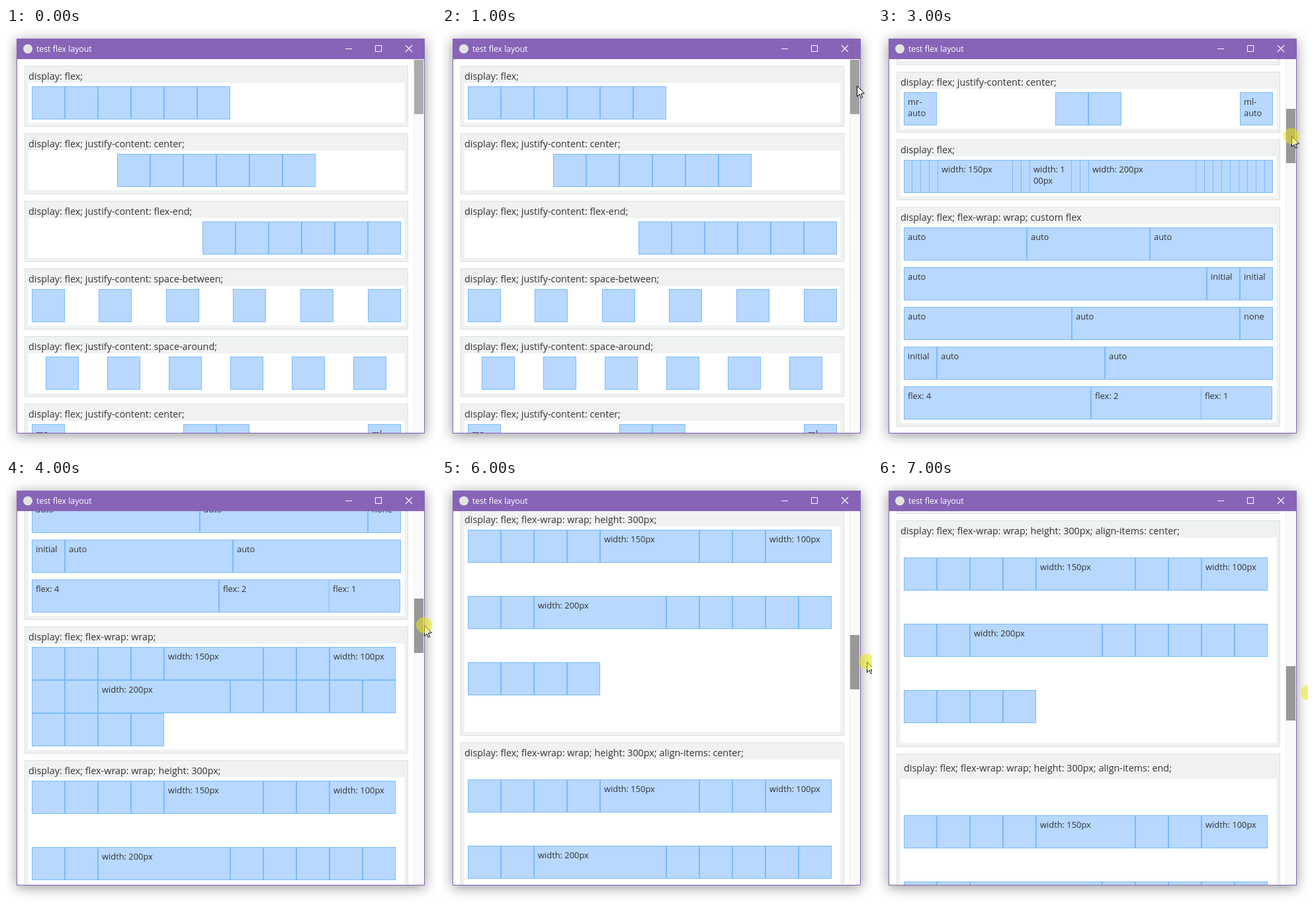
An HTML page with a canvas that plays this animation: 650x640 px, repeating every 7.99 s.

```html
<!DOCTYPE html>
<html lang="en">
<head>
<meta charset="utf-8">
<title>Flex layout</title>
<style>
html, body { margin: 0; width: 100%; height: 100%; overflow: hidden; background: #fff; }
canvas { display: block; }
</style>
</head>
<body>
<canvas id="stage" width="650" height="640"></canvas>
<script>
const ctx = document.getElementById('stage').getContext('2d');
const LOOP = 7990, STEP = 1000;
const FONT = '"Open Sans", "Noto Sans", sans-serif';
const PURPLE = '#8764b8';

// One entry per second: scroll offset, thumb offset, thumb colour, pointer tip, pressed
const steps = [
  { scroll: 0, thumb: 0, shade: '#ababab' },
  { scroll: 0, thumb: 0, shade: '#a1a1a1', tip: [627, 87] },
  { scroll: 0, thumb: 0, tip: [628, 87], pressed: true },
  { scroll: 501, thumb: 74, tip: [625, 163], pressed: true },
  { scroll: 892, thumb: 131, tip: [632, 219], pressed: true },
  { scroll: 1057, thumb: 155, tip: [634, 243], pressed: true },
  { scroll: 1271, thumb: 186, tip: [642, 274], pressed: true },
  { scroll: 1606, thumb: 233, tip: [651, 321], pressed: true }
];

function rect(x, y, w, h, color) {
  ctx.fillStyle = color;
  ctx.fillRect(x, y, w, h);
}

function frame(x, y, w, h, fill, border) {
  rect(x, y, w, h, border);
  rect(x + 1, y + 1, w - 2, h - 2, fill);
}

function text(str, x, y, size, color = '#333') {
  ctx.font = `${size}px ${FONT}`;
  ctx.fillStyle = color;
  ctx.fillText(str, x, y);
}

function circle(x, y, r, color) {
  ctx.fillStyle = color;
  ctx.beginPath();
  ctx.arc(x, y, r, 0, Math.PI * 2);
  ctx.fill();
}

function item(x, y, w = 50, label = '') {
  const left = Math.floor(x);
  frame(left, y, Math.ceil(x + w - 0.001) - left, 50, '#b8d8ff', '#7abaff');
  label.split('\n').forEach((line, i) => text(line, left + 6, y + 19 + i * 17, 12.87));
}

// Cells are widths, or [width, label] pairs, laid side by side
function row(y, cells, x = 39) {
  for (const cell of cells) {
    const [w, label] = [].concat(cell);
    item(x, y, w, label);
    x += w;
  }
}

function spread(y, x, gap) {
  for (let i = 0; i < 6; i++) item(Math.floor(x + gap * i), y);
}

const many = (n, w = 50) => Array(n).fill(w);
const six = x => y => row(y + 31, many(6), x);

const wrapped = (first, pitch) => y => {
  row(y + first, [...many(4), [150, 'width: 150px'], 50, 50, [100, 'width: 100px']]);
  row(y + first + pitch, [50, 50, [200, 'width: 200px'], ...many(5)]);
  row(y + first + pitch * 2, many(4));
};

function autoMargins(y) {
  item(39, y + 31, 50, 'mr-\nauto');
  row(y + 31, many(2), 268);
  item(547, y + 31, 50, 'ml-\nauto');
}

function shrunk(y) {
  const s = 12.9;
  row(y + 31, [...many(4, s), [113, 'width: 150px'], s, s, [63, 'width: 1\n00px'],
    s, s, [162.7, 'width: 200px'], ...many(9, s)]);
}

function customFlex(y) {
  const rows = [
    many(3, [186, 'auto']),
    [[458, 'auto'], [50, 'initial'], [50, 'initial']],
    [[254, 'auto'], [254, 'auto'], [50, 'none']],
    [[50, 'initial'], [254, 'auto'], [254, 'auto']],
    [[283, 'flex: 4'], [166.5, 'flex: 2'], [107.5, 'flex: 1']]
  ];
  rows.forEach((cells, i) => row(y + 31 + i * 60, cells));
}

const flex = 'display: flex;';
const wrap = flex + ' flex-wrap: wrap;';
const tall = wrap + ' height: 300px;';
// label, height, content, extra label padding
const sections = [
  [flex, 92, six(39)],
  [flex + ' justify-content: center;', 92, six(168)],
  [flex + ' justify-content: flex-end;', 92, six(297)],
  [flex + ' justify-content: space-between;', 92, y => spread(y + 31, 39, 101.6)],
  [flex + ' justify-content: space-around;', 92, y => spread(y + 31, 60, 93)],
  [flex + ' justify-content: center;', 92, autoMargins],
  [flex, 92, shrunk],
  [wrap + ' custom flex', 332, customFlex],
  [wrap, 192, wrapped(31, 50)],
  [tall, 342, wrapped(31, 100)],
  [tall + ' align-items: center;', 342, wrapped(56, 100)],
  [tall + ' align-items: end;', 354, wrapped(93, 100), 6]
];

function drawSections(scroll) {
  let y = 57 - scroll;
  for (const [label, h, content, pad = 0] of sections) {
    if (y + h > 47 && y < 611) {
      const head = 26 + pad * 2;
      frame(28, y, 580, h, '#f0f2f2', '#dcdfdf');
      rect(34, y + head, 568, h - head - 6, '#fff');
      text(label, pad ? 39 : 34, y + 21 + pad, 14.37);
      content(y);
    }
    y += h + 10;
  }
}

function drawTitleBar() {
  rect(16, 16, 617, 31, PURPLE);
  circle(33, 31.5, 7, '#e3e5e0');
  text('test flex layout', 46, 36, 12.3, '#fff');
  rect(513, 31, 10, 1, '#fff');
  frame(558, 26, 10, 10, PURPLE, '#fff');
  ctx.strokeStyle = '#fff';
  ctx.lineWidth = 1.1;
  ctx.beginPath();
  ctx.moveTo(604, 26);
  ctx.lineTo(614, 36);
  ctx.moveTo(614, 26);
  ctx.lineTo(604, 36);
  ctx.stroke();
}

function drawPointer([x, y], pressed) {
  const arrow = [[0.5, 0.5], [0.5, 16.5], [4, 13], [6.5, 18.5], [8.7, 17.5], [6.3, 12.2], [11.3, 11.7]];
  ctx.beginPath();
  arrow.forEach(([dx, dy]) => ctx.lineTo(x + dx, y + dy));
  ctx.closePath();
  ctx.fillStyle = '#fff';
  ctx.fill();
  ctx.strokeStyle = '#000';
  ctx.lineWidth = 1;
  ctx.stroke();
  if (pressed) circle(x, y, 12, 'rgba(236,232,15,.53)');
}

function draw(now) {
  const { scroll, thumb, shade = '#989898', tip, pressed } = steps[Math.floor(now % LOOP / STEP)];
  rect(0, 0, 650, 640, '#fff');

  ctx.save();
  ctx.shadowColor = 'rgba(0,0,0,.42)';
  ctx.shadowBlur = 18;
  ctx.shadowOffsetY = 3;
  rect(16, 16, 617, 596, PURPLE);
  ctx.restore();

  ctx.save();
  ctx.beginPath();
  ctx.rect(17, 47, 615, 564);
  ctx.clip();
  rect(17, 47, 615, 564, '#fff');
  drawSections(scroll);
  rect(616, 47, 16, 564, '#fafafa');
  rect(616, 47, 1, 564, '#ececec');
  rect(617, 48 + thumb, 14, 82, shade);
  ctx.restore();

  drawTitleBar();
  if (tip) drawPointer(tip, pressed);
}

const start = performance.now();
function tick() {
  draw(performance.now() - start);
  requestAnimationFrame(tick);
}
tick();
</script>
</body>
</html>
```
